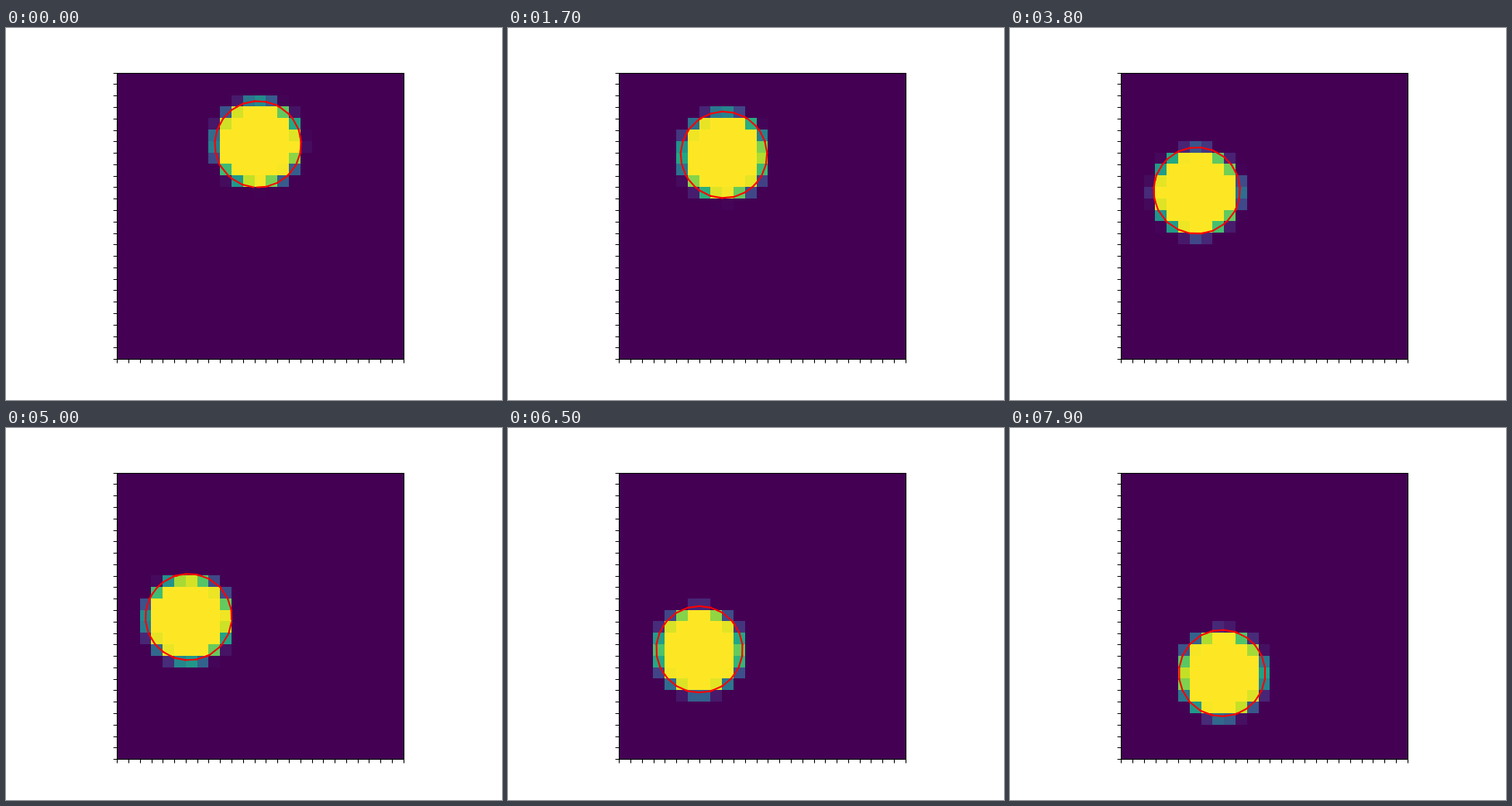
Recreate the animation shown at these times as an HTML page with a canvas. Size 640 by 480 pixels, loop 8000 ms.

```html
<!DOCTYPE html>
<html lang="en">
<head>
<meta charset="utf-8">
<title>Rotating disc on a grid</title>
<style>
html, body { margin: 0; width: 100%; height: 100%; overflow: hidden; background: #fff; }
canvas { display: block; }
</style>
</head>
<body>
<canvas id="stage" width="640" height="480"></canvas>
<script>
const ctx = document.getElementById('stage').getContext('2d');

const N = 25, CELL = 14.784, LEFT = 143.2, TOP = 57.6;
const RADIUS = 3.75, ORBIT = 6.25, MID = N / 2;
const STEP = 2 * Math.PI / 200, STEP_MS = 100, LOOP_MS = 8000;
const LINE = 0.8 / 0.72;

const VIRIDIS = ['440154', '482475', '414487', '355f8d', '2a788e', '21918c',
  '22a884', '44bf70', '7ad151', 'bddf26', 'fde725']
  .map(h => [0, 2, 4].map(i => parseInt(h.slice(i, i + 2), 16)));

const clamp = (v, lo, hi) => Math.min(hi, Math.max(lo, v));

function colour(f) {
  const p = clamp(f, 0, 1) * 10, i = Math.min(9, Math.floor(p)), k = p - i;
  const rgb = VIRIDIS[i].map((c, j) => Math.round(c + (VIRIDIS[i + 1][j] - c) * k));
  return `rgb(${rgb})`;
}

// Share of cell (col, row) covered by the disc at (cx, cy)
function cover(col, row, cx, cy) {
  const samples = 48;
  let sum = 0;
  for (let i = 0; i < samples; i++) {
    const dx = col + (i + 0.5) / samples - cx;
    const h2 = RADIUS * RADIUS - dx * dx;
    if (h2 <= 0) continue;
    const h = Math.sqrt(h2);
    sum += Math.max(0, Math.min(row + 1, cy + h) - Math.max(row, cy - h));
  }
  return sum / samples;
}

function fractions(cx, cy) {
  const grid = [];
  for (let row = 0; row < N; row++) {
    grid.push([]);
    for (let col = 0; col < N; col++) grid[row].push(cover(col, row, cx, cy));
  }
  return grid;
}

// Straight interface piece inside a mixed cell, from the local gradient
function facet(g, col, row) {
  let gx = 0, gy = 0;
  for (let k = -1; k <= 1; k++) {
    const w = 2 - Math.abs(k);
    gx += w * (g[row + k][col + 1] - g[row + k][col - 1]);
    gy += w * (g[row + 1][col + k] - g[row - 1][col + k]);
  }
  const sum = Math.abs(gx) + Math.abs(gy);
  if (!sum) return null;
  const a = clamp(Math.abs(gx) / sum, 1e-6, 1 - 1e-6), b = 1 - a;
  const sq = v => v > 0 ? v * v : 0;
  let lo = 0, hi = 1;
  for (let i = 0; i < 40; i++) {
    const d = (lo + hi) / 2;
    const area = (sq(d) - sq(d - a) - sq(d - b)) / (2 * a * b);
    if (area < g[row][col]) lo = d; else hi = d;
  }
  return [Math.max(0, (lo - b) / a), Math.min(1, lo / a)].map(x => {
    const y = clamp((lo - a * x) / b, 0, 1);
    return [LEFT + CELL * (col + (gx > 0 ? 1 - x : x)),
            TOP + CELL * (row + (gy > 0 ? 1 - y : y))];
  });
}

function drawCells(g) {
  const px = k => 143 + Math.round(14.8 * k), py = k => 57 + Math.round(14.8 * k);
  ctx.fillStyle = colour(0);
  ctx.fillRect(143, 58, 370, 370);
  for (let r = 0; r < N; r++) for (let c = 0; c < N; c++) {
    if (g[r][c] < 0.002) continue;
    ctx.fillStyle = colour(g[r][c]);
    ctx.fillRect(px(c), py(r), px(c + 1) - px(c), py(r + 1) - py(r));
  }
}

function drawInterface(g) {
  ctx.strokeStyle = '#f00';
  ctx.lineWidth = 1.5 / 0.72;
  ctx.lineCap = 'square';
  for (let r = 1; r < N - 1; r++) for (let c = 1; c < N - 1; c++) {
    if (g[r][c] < 0.001 || g[r][c] > 0.999) continue;
    const ends = facet(g, c, r);
    if (!ends) continue;
    ctx.beginPath();
    ctx.moveTo(...ends[0]);
    ctx.lineTo(...ends[1]);
    ctx.stroke();
  }
}

function drawAxes() {
  ctx.strokeStyle = '#000';
  ctx.lineWidth = LINE;
  ctx.lineCap = 'butt';
  ctx.strokeRect(143.5, 58.5, 370, 369);
  ctx.beginPath();
  for (let k = 0; k <= N; k++) {
    const x = Math.round(LEFT + CELL * k) + 0.5, y = Math.round(TOP + CELL * k) + 0.5;
    ctx.moveTo(x, 427.5);
    ctx.lineTo(x, 432.4);
    ctx.moveTo(143.5, y);
    ctx.lineTo(138.6, y);
  }
  ctx.stroke();
}

// The two axes advance in turn, so the fill runs half a step ahead vertically
function draw(n) {
  const x = MID - ORBIT * Math.sin(n * STEP);
  const yAt = s => MID - ORBIT * Math.cos(s * STEP);
  ctx.fillStyle = '#fff';
  ctx.fillRect(0, 0, 640, 480);
  drawCells(fractions(x, yAt(n + 0.5)));
  drawInterface(fractions(x, yAt(n - 0.5)));
  drawAxes();
}

const start = performance.now();
let shown = 0;
function tick() {
  const t = (performance.now() - start) % LOOP_MS;
  const n = 1 + Math.floor(t / STEP_MS);
  if (n !== shown) draw(shown = n);
  requestAnimationFrame(tick);
}
tick();
</script>
</body>
</html>
```
